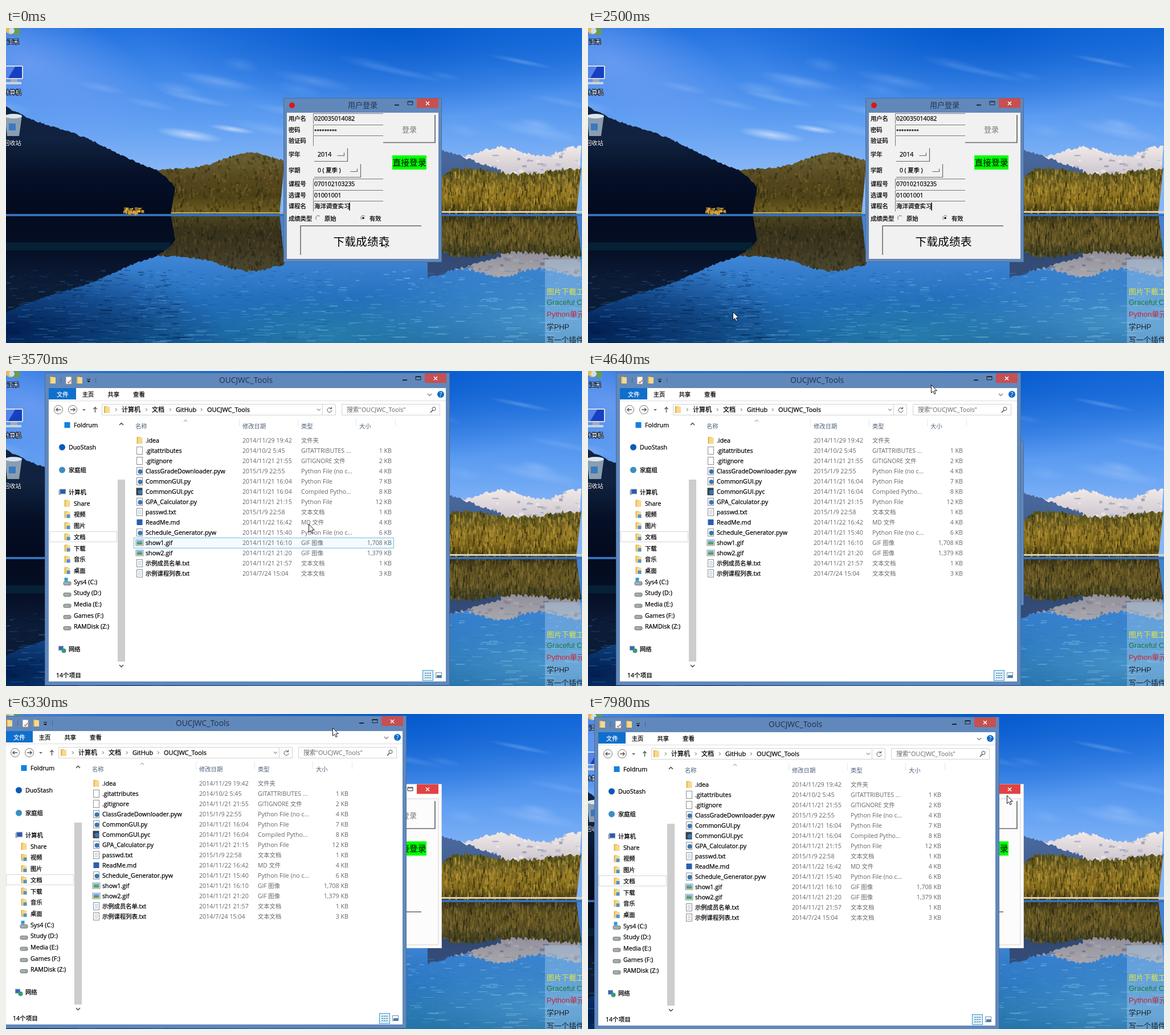
Recreate the animation shown at these times as an HTML page with a canvas. Size 1011x554 px, loop 8 s.

```html
<!DOCTYPE html>
<html lang="zh">
<head>
<meta charset="utf-8">
<title>Desktop</title>
<style>
html, body { margin: 0; width: 100%; height: 100%; overflow: hidden; background: #2f78c8; }
canvas, svg { position: absolute; left: 0; top: 0; width: 1011px; height: 554px; }
svg { overflow: hidden; font: 10.7px "Open Sans", "Noto Sans CJK SC", "Noto Sans CJK", sans-serif; }
text { white-space: pre; }
.strong { stroke: #000; stroke-width: .25px; }
.label { fill: #fff; font-weight: 500; paint-order: stroke; stroke: #0a1830; stroke-width: 2px; }
.note { font: 13px "Liberation Sans", "Noto Sans CJK SC", "Noto Sans CJK", sans-serif; }
.frame { fill: #6188bb; stroke: #4a6d9c; }
.client { fill: #f1f1f1; }
.close { fill: #c75050; }
.faded .frame { fill: #fff; stroke: #d4d8dc; }
.faded .client { fill: #fcfcfc; stroke: #d0d0d0; }
.faded .close { fill: #e04343; }
</style>
</head>
<body>
<canvas id="photo" width="1011" height="554"></canvas>
<svg id="stage" viewBox="0 0 1011 554"></svg>
<script>
const ctx = document.getElementById('photo').getContext('2d');
const SHORE = 327;
let seed = 7;
const rand = () => (seed = (seed * 16807) % 2147483647) / 2147483647;
const pick = list => list[Math.floor(rand() * list.length)];

function gradient(y0, y1, colors) {
  const g = ctx.createLinearGradient(0, y0, 0, y1);
  colors.forEach((c, i) => g.addColorStop(colors.length > 1 ? i / (colors.length - 1) : 0, c));
  return g;
}

function band(y, h, fill, x = 0, w = 1011) {
  ctx.fillStyle = fill;
  ctx.fillRect(x, y, w, h);
}

function glow(x, y, rx, ry, rgb, alpha, turn = 0) {
  ctx.save();
  ctx.translate(x, y);
  ctx.rotate(turn);
  ctx.scale(rx, ry);
  const g = ctx.createRadialGradient(0, 0, 0, 0, 0, 1);
  g.addColorStop(0, `rgba(${rgb},${alpha})`);
  g.addColorStop(1, `rgba(${rgb},0)`);
  ctx.fillStyle = g;
  ctx.fillRect(-1, -1, 2, 2);
  ctx.restore();
}

function flecks(count, x, y, w, h, colors, fw, fh, alpha) {
  ctx.globalAlpha = alpha;
  for (let i = 0; i < count; i++) {
    ctx.fillStyle = pick(colors);
    ctx.fillRect(x + rand() * w, y + rand() * h, fw * (0.4 + rand()), fh * (0.4 + rand()));
  }
  ctx.globalAlpha = 1;
}

// Each hill is a skyline formula; the lake shows the same skyline upside down.
const hills = [
  { x0: 740, x1: 1011, top: x => 217 - 8 * Math.cos((x - 868) / 22), jag: 6,
    colors: ['#f0e8e6', '#c4bfcb', '#7485ac'], specks: ['#6678a0', '#fff6f2', '#a5a4b8'], fw: 8, fh: 4, count: 170 },
  { x0: 740, x1: 870, top: x => 215 + (x - 765) * 0.33, jag: 5, colors: ['#48679c', '#3a5478'], count: 0 },
  { x0: 740, x1: 1011, top: x => 252 + 5 * Math.sin((x - 850) / 32) + Math.max(0, 790 - x) * 0.4, jag: 8,
    colors: ['#55521f', '#8d7424', '#8a701d', '#3a3512'], specks: ['#211f0a', '#b39232', '#5e521a', '#c9a646'], fw: 2, fh: 9, count: 1200 },
  { x0: 255, x1: 490, top: x => 250 - 24 * Math.exp(-(((x - 425) / 60) ** 2)) - (x - 255) * 0.04, jag: 4,
    colors: ['#655a30', '#56481f', '#4d4218', '#72601e'], specks: ['#2a260f', '#80682a', '#463e18'], fw: 3, fh: 6, count: 650 },
  { x0: 0, x1: 299, top: x => 139 + x * 0.41 + 3 * Math.sin(x / 30) + Math.max(0, x - 255) ** 2 * 0.012, jag: 3,
    colors: ['#10223f', '#050f26', '#030a1e'], count: 0 }
];

function paintHill({ x0, x1, top, jag, colors, specks, fw, fh, count }, mirrored) {
  const level = y => mirrored ? SHORE + 4 + (SHORE - y) * 0.9 : y;
  const crest = level(top((x0 + x1) / 2));
  ctx.beginPath();
  ctx.moveTo(x0, SHORE);
  for (let x = x0; x <= x1; x += 3) ctx.lineTo(x, level(top(x)) + (rand() - 0.5) * jag);
  ctx.lineTo(x1 - 10, SHORE);
  ctx.fillStyle = gradient(crest, SHORE, colors);
  ctx.save();
  ctx.fill();
  ctx.clip();
  if (count) flecks(count, x0, Math.min(crest - 14, SHORE), x1 - x0, Math.abs(SHORE - crest) + 14, specks, fw, fh, 0.5);
  if (mirrored) {
    ctx.globalAlpha = 0.3;
    band(SHORE, 180, '#041024', x0, x1 - x0);
  }
  ctx.restore();
}

function paintSky() {
  band(0, SHORE, gradient(0, 250, ['#2272e0', '#4189ea', '#609ff2', '#86b6f6']));
  glow(680, -10, 430, 170, '0,86,202', 0.95);
  glow(1000, 0, 200, 120, '10,98,212', 0.5);
  glow(40, 60, 260, 110, '122,164,244', 0.7, 0.4);
  for (let i = 0; i < 26; i++)
    glow(rand() * 1011, 40 + rand() * 160, 30 + rand() * 60, 5 + rand() * 9, '190,215,252', 0.12 + rand() * 0.2, 0.2);
  glow(322, 188, 60, 10, '240,246,255', 0.6, 0.15);
  glow(398, 178, 42, 6, '240,246,255', 0.6, 0.15);
}

function paintLake() {
  band(SHORE, 227, gradient(SHORE, 554, ['#4580d0', '#3f86d6', '#236fbc', '#17629c']));
  glow(960, 515, 360, 100, '104,180,224', 0.55);
  glow(570, 540, 230, 70, '46,140,176', 0.6);
  glow(0, 530, 380, 130, '0,26,76', 0.95);
  hills.forEach(hill => paintHill(hill, true));
  band(377, 14, 'rgba(8,48,66,.55)', 0, 288);
  // Ripples grow longer towards the viewer.
  for (let y = 425; y < 554; y += 2) {
    const near = (y - 425) / 129;
    flecks(7, 0, y, 300, 2, ['#011633', '#3a80c8', '#05336f'], 8 + 14 * near, 1.4, 0.4);
    flecks(6, 230, y, 330, 2, ['#76b4e8', '#154f98', '#247aae'], 8 + 14 * near, 1.4, 0.38);
    flecks(8, 520, y, 490, 2, ['#9acfea', '#2a76b2', '#4592c8'], 8 + 14 * near, 1.4, 0.38);
  }
  band(SHORE, 4, '#3670b8');
  band(SHORE - 5, 3, '#ded2b6', 740, 271);
  band(SHORE - 3, 2, '#b6aa75', 290, 200);
  flecks(60, 206, 315, 32, 9, ['#d09a30', '#8a6a24', '#e0b44a'], 4, 4, 0.9);
}

paintSky();
hills.forEach(hill => paintHill(hill, false));
paintLake();

const text = (x, y, s, attrs = '') =>
  `<text x="${x}" y="${y}" ${attrs} font-size="${/[\u3000-\u9fff]/.test(s) ? 10.3 : 10.7}">${s}</text>`;
const strong = (x, y, s, attrs = '') => text(x, y, s, `class="strong" ${attrs}`);
const middle = (x, y, s, size, fill = '#000') => text(x, y, s, `text-anchor="middle" font-size="${size}" fill="${fill}"`);
const rect = (x, y, w, h, fill, attrs = '') =>
  `<rect x="${x}" y="${y}" width="${w}" height="${h}" fill="${fill}" ${attrs}/>`;
const path = (d, stroke = '#555', width = 1) => `<path d="${d}" fill="none" stroke="${stroke}" stroke-width="${width}"/>`;
const dot = (x, y, r, fill, attrs = '') => `<circle cx="${x}" cy="${y}" r="${r}" fill="${fill}" ${attrs}/>`;
const group = (id, body) => `<g id="${id}">${body}</g>`;

// Icons are drawn around their own centre.
const page = rect(-5, -6.5, 10, 13, '#fff', 'stroke="#8a8f96"');
const folder = rect(-5, -6, 6, 12, '#e0b24d') + rect(-3, -5, 8, 11, '#f6d98a');
const disk = rect(-6.5, 0, 13, 6, '#a9adb2', 'rx="2" stroke="#6c7074"') + rect(2, 2.5, 3, 1.5, '#58c058');
const icons = {
  folder, page, disk,
  text: page + path('M-3-3H3M-3 0H3M-3 3H3', '#9fb0c0'),
  script: page + dot(1, 1, 4, '#3a76b0'),
  compiled: rect(-6, -6.5, 11, 13, '#3a4048') + dot(1, 1, 4, '#3a76b0'),
  word: rect(-5, -5, 10, 10, '#2b5fae'),
  image: rect(-6.5, -5, 13, 10, '#fff', 'stroke="#7a8a99"') + rect(-5, -3.5, 10, 4, '#58a6dc') + rect(-5, 0, 10, 3.5, '#6a9a3c'),
  square: rect(-5, -5, 10, 10, '#1281dc'),
  cloud: dot(0, 0, 5.5, '#0a5bb8'),
  home: dot(0, 0, 5.5, '#3a8fc0'),
  pc: rect(-4, -5, 10, 8, '#2859b8', 'stroke="#8a98a8"') + rect(-6, -4, 3, 9, '#9aa4b0'),
  library: folder + rect(-1, 0, 6, 6, '#4f93cc'),
  system: disk + rect(-5, -7, 6, 6, '#2a9ad8'),
  net: rect(-6, -5, 8, 7, '#3069c0', 'stroke="#8a98a8"') + dot(3, 3, 4, '#3c9a70')
};
const icon = (kind, x, y) => `<g transform="translate(${x} ${y})">${icons[kind]}</g>`;

// Caption buttons keep the same spacing from the right edge of any window.
function controls(right, y) {
  const close = right - 25;
  return path(`M${close - 58} ${y + 3}h8`, '#1c2634', 2) +
    path(`M${close - 35} ${y - 3.5}h9v6h-9zm0 1h9`, '#1c2634') +
    `<rect class="close" x="${close - 19}" y="${y - 9}" width="38" height="17"/>` +
    path(`M${close - 3} ${y - 3}l6 6m0-6l-6 6`, '#fff', 1.5);
}

function desktop() {
  const user = dot(8, 2, 9, '#e0bd58') + dot(18, 6, 7, '#6a9a58') + dot(10, 5, 5, '#cfe0ee');
  const computer = rect(-2, 66, 32, 24, '#d3dce8', 'rx="2"') + rect(0, 68, 28, 20, '#1640c0') +
    '<path d="M0 68h16L4 88H0z" fill="#5684e8"/>' + rect(8, 90, 12, 5, '#9eacbc') + rect(0, 95, 27, 4, '#cdd4dc');
  const bin = '<path d="M-2 154H28L23 190H2z" fill="#a8bdcc" opacity=".8"/><ellipse cx="13" cy="155" rx="15" ry="4" fill="#dbe6ee"/>' +
    rect(5, 168, 12, 12, '#3a78c0');
  const names = ['江禾', '计算机', '回收站']
    .map((s, i) => text(i ? -4 : 2, 28 + i * 89, s, 'class="label"')).join('');
  const colors = ['#e2e63c', '#167a36', '#d2202c', '#182430', '#182430'];
  const note = ['图片下载工', 'Graceful C', 'Python单元', '学PHP', '写一个插件']
    .map((s, i) => `<text x="949" y="${468 + 18.5 * i + 0.7 * i * i}" fill="${colors[i]}">${s}</text>`).join('');
  return user + computer + bin + names + rect(946, 407, 65, 147, '#a9cdf0', 'opacity=".4"') + `<g class="note">${note}</g>`;
}

const fields = [
  ['entry', '用户名', '020035014082'], ['entry', '密码', '*********'], ['entry', '验证码', ''],
  ['menu', '学年', '2014'], ['menu', '学期', '0 ( 夏季 )'],
  ['entry', '课程号', '070102103235'], ['entry', '选课号', '01001001'], ['entry', '课程名', '海洋调查实习'],
  ['radio', '成绩类型', '原始,有效']
];
const fieldHeight = { entry: 19.7, menu: 28, radio: 23 };
const drawField = {
  entry: (y, s) => path(`M662 ${Math.round(y - 9) + 0.5}H539.500v18`, '#777') +
    strong(541, y + 4, s, s[0] === '*' ? 'font-size="8"' : s ? 'font-size="10.4"' : ''),
  menu(y, s) {
    const right = s.length > 4 ? 622.5 : 599.5, low = Math.round(y + 12) + 0.5;
    return path(`M541 ${low}H${right}v-23M${right - 18} ${low - 10}h12v-5`, '#666', 1.2) + strong(547, y + 4, s);
  },
  radio: (y, s) => s.split(',').map((name, i) => {
    const x = 548 + i * 79;
    return path(`M${x - 3} ${y + 2.5}a4 4 0 1 1 6-6`, '#666') + (i ? dot(x, y - 0.5, 1.8, '#000') : '') + strong(x + 11, y + 4, name);
  }).join('')
};

function dialog() {
  let top = 149;
  const form = fields.map(([kind, label, value]) => {
    const y = top + fieldHeight[kind] / 2;
    top += fieldHeight[kind];
    return strong(496, y + 4, label) + drawField[kind](y, value);
  }).join('');
  return '<rect class="frame" x="487.5" y="123.5" width="277" height="288"/>' +
    '<rect class="client" x="493" y="149" width="266" height="257"/>' +
    dot(502, 136, 5, '#d81818') + middle(626, 140, '用户登录', 13, '#26354c') + controls(765, 132.5) + form +
    path('M603 307v14', '#000', 1.5) +
    path('M662 201.5h91V153', '#666', 1.7) + middle(708, 183, '登录', 13, '#777') +
    rect(678, 224, 60, 25, '#0f0') + middle(708, 242, '直接登录', 14.7) +
    path('M729 348H517v51', '#666', 1.5) + middle(624, 383, '下载成绩表', 19.8);
}

const files = `folder|.idea|2014/11/29 19:42|文件夹|
page|.gitattributes|2014/10/2 5:45|GITATTRIBUTES ...|1 KB
page|.gitignore|2014/11/21 21:55|GITIGNORE 文件|2 KB
script|ClassGradeDownloader.pyw|2015/1/9 22:55|Python File (no c...|4 KB
script|CommonGUI.py|2014/11/21 16:04|Python File|7 KB
compiled|CommonGUI.pyc|2014/11/21 16:04|Compiled Pytho...|8 KB
script|GPA_Calculator.py|2014/11/21 21:15|Python File|12 KB
text|passwd.txt|2015/1/9 22:58|文本文档|1 KB
word|ReadMe.md|2014/11/22 16:42|MD 文件|4 KB
script|Schedule_Generator.pyw|2014/11/21 15:40|Python File (no c...|6 KB
image|show1.gif|2014/11/21 16:10|GIF 图像|1,708 KB
image|show2.gif|2014/11/21 21:20|GIF 图像|1,379 KB
text|示例成员名单.txt|2014/11/21 21:57|文本文档|1 KB
text|示例课程列表.txt|2014/7/24 15:04|文本文档|3 KB`.split('\n').map(row => row.split('|'));
const columns = { 名称: 227, 修改日期: 415, 类型: 518, 大小: 620 };
const rowTop = i => 113.5 + i * 18;

function fileList() {
  const gray = 'fill="#666"';
  const head = Object.entries(columns).map(([s, x], i) =>
    text(x, 100.5, s, 'fill="#4c607a"') + (i ? path(`M${x - 5.5} 84v13`, '#dce8f2') : '')).join('');
  const rows = files.map(([kind, name, date, type, size], i) => {
    const y = rowTop(i) + 12.5;
    return icon(kind, 234.5, y - 4) + strong(245, y, name) + text(columns.修改日期, y, date, gray) +
      text(columns.类型, y, type, gray) + text(677, y, size, gray + ' text-anchor="end"');
  }).join('');
  return head + path('M683.5 84v13', '#dce8f2') + path('M312 89l3-3 3 3', '#5a8ab4') +
    rect(224.5, 0, 456, 18, '#f4fafe', 'id="hover" stroke="#70c0e7"') + rows;
}

function sidebar() {
  const entry = (x, y, kind, s) => icon(kind, x - 11.5, y) + strong(x, y + 4, s);
  const places = 'Share,视频,图片,文档,下载,音乐,桌面,Sys4 (C:),Study (D:),Media (E:),Games (F:),RAMDisk (Z:)'.split(',');
  const kindOf = i => i === 0 ? 'folder' : i < 7 ? 'library' : i === 7 ? 'system' : 'disk';
  return rect(76.5, 282.5, 118, 18, '#fff', 'stroke="#d5d5d5"') +
    entry(119, 95, 'square', 'Foldrum') + entry(110, 134, 'cloud', 'DuoStash') +
    entry(110, 174, 'home', '家庭组') + entry(110, 213, 'pc', '计算机') +
    places.map((s, i) => entry(119, 213 + (i + 1) * 19.7, kindOf(i), s)).join('') +
    entry(110, 489, 'net', '网络') + rect(196, 191, 13, 320, '#cdcdcd') +
    path('M199 95l3.500-3.500 3.500 3.500M199 517l3.500 3.500 3.500-3.500', '#444', 1.5);
}

function toolbar() {
  const tabs = ['文件', '主页', '共享', '查看'].map((s, i) => strong(89 + i * 44.7, 45, s, i ? '' : 'fill="#fff" style="stroke:#fff"'));
  const crumbs = Object.entries({ 计算机: 203, 文档: 256, GitHub: 298, OUCJWC_Tools: 353 })
    .map(([s, x]) => path(`M${x - 11} 65.5l2.500 2.500-2.500 2.500`) + strong(x, 71.5, s, 'font-size="11"'));
  const ring = x => dot(x, 68, 7.5, '#fff', 'stroke="#777"');
  return rect(75, 30, 48, 20, '#0f70cc') + tabs.join('') +
    path('M740 40l3.500 3.500 3.500-3.500', '#888', 1.5) + dot(763, 41, 6, '#0e6cc4') + middle(763, 45, '?', 10.7, '#fff') +
    path('M75 52.5H772', '#dadbdc') + ring(92) + ring(117) +
    path('M96 68h-8l3-3m-3 3l3 3M113 68h8l-3-3m3 3l-3 3M156.5 73v-9l-3 3m3-3l3 3', '#555', 1.4) +
    '<path d="M134 67h6l-3 3z" fill="#666"/>' +
    path('M168.5 58.5h410v19h-410zM555.5 58v20M589.5 58.5h172v19h-172z', '#d2d2d2') + icon('folder', 177, 68) + crumbs.join('') +
    path('M546 66.5l3 3 3-3', '#444') + path('M571 66a4 4 0 1 0 1 3M571.5 63v3.500h-3.500') +
    text(598, 71.5, '搜索"OUCJWC_Tools"', 'font-size="10.8" fill="#666"') +
    dot(751, 66.5, 3, 'none', 'stroke="#444"') + path('M749 69l-4 4', '#444', 1.5);
}

function explorer() {
  return '<rect class="frame" x="68.5" y="3.5" width="710" height="549"/>' + rect(75, 30, 697, 516, '#fff') +
    icon('folder', 82, 16) + icon('page', 110, 16.5) + path('M108 19l2 2 4-5', '#d86030', 1.5) + icon('folder', 129, 16) +
    path('M96.5 12v9m61-9v9', '#48658c') + '<path d="M142 17h6l-3 3z"/>' + path('M142 14.5h6', '#111') +
    middle(421, 21, 'OUCJWC_Tools', 13.8, '#22304a') +
    controls(779, 13) + toolbar() + sidebar() + fileList() + strong(88, 539, '14个项目', 'font-size="10.6"') +
    rect(731.5, 526.5, 18, 18, '#d8eefa', 'stroke="#3a9ad0"') +
    [531.5, 535.5, 539.5].map(y => path(`M735 ${y}h12`, '#4a6a88').replace('/>', ' stroke-dasharray="3 1"/>')).join('') +
    rect(754.5, 530.5, 10, 9, '#fff', 'stroke="#7a8a99"') + rect(756, 535, 8, 4, '#3a80b8');
}

document.getElementById('stage').innerHTML = desktop() + group('dialog', dialog()) + group('explorer', explorer()) +
  group('pointer', '<path d="M.5 .5v14l3.200-3 2.300 5.200 2.200-1-2.200-5h4.400z" fill="#fff" stroke="#000" stroke-width=".9"/>');

const LOOP = 8000;
const OFF = [-2000, 0];
const linear = f => f;
const easeOut = f => 1 - (1 - f) ** 3;

// A leg starts at a time and goes from one place to another in a few visible steps.
const leg = (start, from, to = from, steps = 1, beat = 130, easeX = linear, easeY = linear) =>
  ({ start, from, to, steps, beat, easeX, easeY });
const pointerLegs = [
  leg(0, [660, 369]),
  leg(270, [660, 369], [191, 531], 3, 130, easeOut),
  leg(790, OFF),
  leg(1350, [258, 498], [253, 499], 5, 284),
  leg(3300, [96, 537], [522, 230], 1, 120),
  leg(3570, [531, 269], [649, 24], 5, 138, easeOut, easeOut),
  leg(4640, [602, 24], [564, 23], 2),
  leg(6330, [573, 24], [592, 26], 2, 120),
  leg(7130, [575, 105], [674, 201], 3),
  leg(7670, [698, 145], [735, 143], 2, 155)
];
const windowLegs = [
  leg(0, OFF),
  leg(3570, [0, 0]),
  leg(4640, [-19, 0], [-85, -1], 2),
  leg(6330, [-76, 0], [-57, 2], 2, 120)
];
const hovers = [
  { start: 0, file: 'show1.gif' }, { start: 3720, file: '.gitignore' }, { start: 3870 },
  { start: 7250, file: 'ClassGradeDownloader.pyw' }, { start: 7400, file: '.gitattributes' }, { start: 7520 }
];

const current = (list, t) => list.filter(item => item.start <= t).at(-1);
const el = id => document.getElementById(id);

function move(id, legs, t) {
  const { start, from, to, steps, beat, easeX, easeY } = current(legs, t);
  const f = Math.min(steps, Math.floor((t - start) / beat)) / steps;
  const x = Math.round(from[0] + (to[0] - from[0]) * easeX(f));
  const y = Math.round(from[1] + (to[1] - from[1]) * easeY(f));
  el(id).setAttribute('transform', `translate(${x} ${y})`);
}

function draw() {
  const t = performance.now() % LOOP;
  move('pointer', pointerLegs, t);
  move('explorer', windowLegs, t);
  const row = files.findIndex(([, name]) => name === current(hovers, t).file);
  el('hover').setAttribute('visibility', row < 0 ? 'hidden' : 'visible');
  el('hover').setAttribute('y', rowTop(row));
  el('dialog').classList.toggle('faded', t >= 4900);
  requestAnimationFrame(draw);
}
draw();
</script>
</body>
</html>
```
